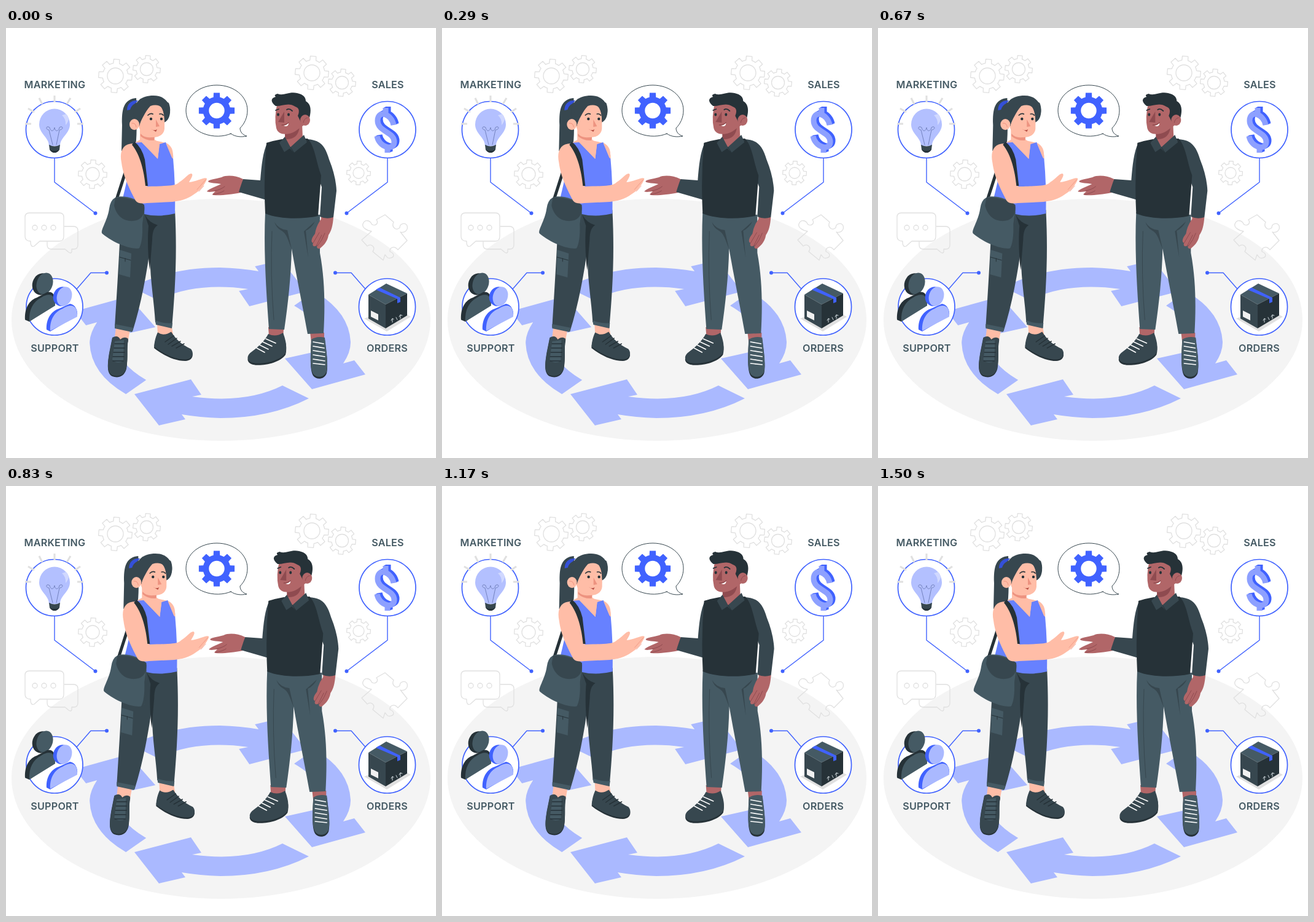
Write an HTML page that moves like this. It is 700 by 700 pixels and loops after 1.54 s.

```html
<!DOCTYPE html>
<html lang="en">
<head>
<meta charset="utf-8">
<style>
html, body { margin: 0; height: 100%; overflow: hidden; background: #fff; }
svg { display: block; width: 100vw; height: 100vh; fill: none; stroke-linecap: round; stroke-linejoin: round; }
text { font: 600 16.2px Inter, Roboto, sans-serif; letter-spacing: .2px; fill: #455a64; text-anchor: middle; }
.blue { fill: #4062ff; } .light { fill: #aab9ff; } .shirt { fill: #6781ff; }
.black { fill: #263238; } .dark { fill: #37474f; } .slate { fill: #455a64; }
.skin { fill: #ffbda7; } .blush { fill: #ed9380; } .brown { fill: #b16668; } .umber { fill: #8f4b50; }
.white { fill: #fff; } .grey { stroke: #e0e0e0; stroke-width: 1.3; }
.line { stroke: #4062ff; stroke-width: 1.4; }
.ink { stroke: #263238; stroke-width: 1; }
.lace { stroke: #fff; stroke-width: 1.6; } .cord { stroke: #263238; stroke-width: 1.5; }
</style>
</head>
<body>
<svg viewBox="0 0 700 700">
  <ellipse cx="350" cy="475" rx="341" ry="197" fill="#f4f4f4"/>
  <g class="light">
    <g id="arrows">
      <path d="M469 452Q517 480 517 513Q517 520 512 525L454 538 498 588 585 564 567 541 549 546Q561 528 561 512Q559 462 502 429Z"/>
      <path d="M209 596L301 572 318 597 303 600Q390 612 450 582L493 603Q430 635 349 635Q315 634 286 629L292 637 249 647Z"/>
    </g>
    <use href="#arrows" transform="rotate(180 348.600 512.500)"/>
  </g>

  <g id="gears" class="grey"></g>
  <g class="grey">
    <path d="M38 301H87Q94 301 94 308V339Q94 347 87 347H55L46 355Q40 358 40 347Q31 347 31 339V308Q31 301 38 301Z"/>
    <path d="M95 323H110Q117 323 117 330V353Q117 360 110 360H107V364Q106 368 102 365L96 360H74Q67 360 67 353V348"/>
    <circle cx="47" cy="325" r="4"/><circle cx="62" cy="325" r="4"/><circle cx="77" cy="325" r="4"/>
    <path d="M617 304L631 316C627 324 635 331 641 325C641 318 650 316 653 322C655 330 648 334 642 332L653 346 638 361C632 354 624 357 625 364C633 367 632 373 627 374C620 377 619 370 617 369L614 378 597 364C602 357 595 350 588 355L579 345 595 331C588 330 579 325 581 319C584 311 593 313 595 319C600 324 608 318 603 312Z"/>
  </g>

  <path d="M366 172C354 177 338 178 322 172C304 165 293 151 293 134C293 111 315 93 343 93C371 93 393 111 393 134C393 146 388 156 381 163C381 169 385 174 392 176C382 178 373 177 366 172Z" class="white" stroke="#37474f"/>

  <g class="line">
    <path d="M79 212V251L145.500 301.500M621 212V251L554.500 301.500M115 425L138 398.500H164M586 426L562 398.500H536"/>
    <g class="white" stroke-width="1.700">
      <circle cx="78.500" cy="165.500" r="46"/><circle cx="621" cy="165.500" r="46"/>
      <circle cx="79" cy="454" r="46"/><circle cx="620.500" cy="454" r="46"/>
    </g>
  </g>
  <g class="blue">
    <circle cx="145.500" cy="301.500" r="3"/><circle cx="554.500" cy="301.500" r="3"/>
    <circle cx="164" cy="398.500" r="3"/><circle cx="536" cy="398.500" r="3"/>
  </g>
  <text x="79.500" y="98">MARKETING</text><text x="621.500" y="98">SALES</text>
  <text x="79.500" y="527">SUPPORT</text><text x="620.500" y="527">ORDERS</text>

  <!-- bulb -->
  <path d="M79 110V121M54 114L59 124M105 114L99 124M36 131L46 137M121 131L112 137M31 156H41M116 156H126" stroke="#e0e0e0" stroke-width="3" stroke-linecap="butt"/>
  <path d="M70 192C70 178 54 172 54 157A25 25.500 0 0 1 104 157C104 172 88 178 88 192Z" fill="#b3c0ff"/>
  <path d="M91 142Q98 148 97 158Q106 148 98 140Z" fill="#d0d8ff"/>
  <path d="M76 190L70 166C63 165 66 158 71 162C73 170 78 168 79 162C80 170 86 168 87 162C92 158 95 165 87 166L82 190" stroke="#6371ad" stroke-width=".8"/>
  <path d="M70 190Q79 195 88 190L87 198Q79 208 71 198Z" class="dark"/>
  <path d="M71 198Q79 202 87 198Q84 203 79 203Q74 203 71 198Z" class="black"/>

  <!-- dollar -->
  <g stroke-linecap="butt">
    <g stroke="#4062ff" stroke-width="9">
      <path id="dollar" d="M635 156C632 138 609 130 609 149C609 167 637 167 636 184C635 199 611 192 608 174M622 128V142M625 190V201"/>
      <use href="#dollar" x="-2" y="1"/>
    </g>
    <use href="#dollar" x="-4" y="2" stroke="#8da0ff" stroke-width="9"/>
  </g>

  <!-- support people -->
  <ellipse cx="58" cy="417" rx="15" ry="18" transform="rotate(18 58 417)" class="black"/>
  <ellipse cx="63" cy="416" rx="13" ry="18" transform="rotate(18 63 416)" class="slate"/>
  <path d="M31 475C30 454 39 443 50 439L67 430C77 428 81 436 80 448L38 478Z" class="black"/>
  <path d="M38 478C37 458 44 446 57 439C71 430 81 434 80 452Z" class="slate"/>
  <ellipse cx="91" cy="437" rx="14" ry="16" transform="rotate(18 91 437)" class="blue"/>
  <ellipse cx="95" cy="437" rx="12" ry="16" transform="rotate(18 95 437)" class="light"/>
  <path d="M66 491C65 473 74 461 86 457L104 449C113 450 117 460 116 468L72 494Z" class="blue"/>
  <path d="M72 493C71 475 79 462 92 457C107 447 117 452 116 470Z" class="light"/>

  <!-- parcel -->
  <path d="M583 473L620 494 659 470 630 455Z" fill="#e0e0e0"/>
  <path d="M590 434L619 416 653 432 618 450Z" class="slate"/>
  <path d="M590 434L618 450V489L590 473Z" class="dark"/>
  <path d="M618 450L653 432V468L618 489Z" class="black"/>
  <path d="M602 426L608 422.500 642 439V446L637 448V441Z" class="blue"/>
  <path d="M594 460L606 466V476L594 470Z" fill="#f0f0f0"/>
  <path d="M629 473V479M627 476L629 473 631 474M635 471L637 475M642 467V473M640 470L642 467 645 468" stroke="#cfd8dc"/>

  <g id="people">
    <!-- woman -->
    <path d="M212 114C192 116 188 131 189 158L188 200H210C214 175 212 155 213 130Z" class="dark"/>
    <path d="M208 192L181 276" stroke="#263238" stroke-width="5"/>
    <path d="M179 487L202 491 199 507Q186 513 177 504ZM246 482L270 487 272 499Q259 506 247 499Z" class="skin"/>
    <g class="black">
      <path id="frontShoe" d="M173 506Q182 501 186 509Q193 503 199 508C196 522 199 537 196 555C192 569 181 570 173 567C164 562 165 550 168 531Z"/>
      <path id="sideShoe" d="M247 498Q257 505 269 497C278 512 290 520 301 525C307 532 303 542 292 542C274 542 255 532 241 521C242 511 244 504 247 498Z"/>
    </g>
    <g class="dark"><use href="#frontShoe" y="-2"/><use href="#sideShoe" y="-2.500"/></g>
    <path d="M177 510L192 508 191 542Q181 548 173 540Z" class="slate"/>
    <path d="M177 514H193M176 521H193M175 528H193M174 535H192M174 542H191" class="cord"/>
    <path d="M259 511L273 501M264 515L278 505M270 518L284 510M277 521L290 514" class="cord"/>
    <path d="M185 350C183 390 180 440 177 487L206 494C220 450 229 400 236 349C231 392 241 440 243 479L270 488C275 430 279 370 275 296L215 298Z" class="dark"/>
    <path d="M226 304Q233 317 247 321Q238 326 238 345L234 394C230 360 231 334 232 322Z" class="black"/>
    <path d="M177 482L207 488 205 495 177 489ZM243 476Q258 482 271 480L270 489 244 483Z" class="slate"/>
    <path d="M185 361L204 367 202 406 184 401Z" class="slate"/>
    <path d="M185 373L203 378M194 375V380" class="ink"/>
    <path d="M218 164L218 182 207 188 222 214 248 219 270 212C274 204 271 191 260 187L242 183 241 170Z" class="skin"/>
    <path d="M207 187L221 186 247 213 250 189 260 186 272 212Q276 255 275 302Q248 309 220 302L190 277Q196 253 200 233Z" class="shirt"/>
    <path d="M221 186L247 213 250 188 240 180Z" class="skin"/>
    <path d="M272 213Q274 200 260 187L270 211Z" class="skin"/>
    <path d="M178 276C191 271 214 278 225 288C226 315 224 340 222 356C216 364 181 355 157 335C152 331 165 315 168 294Q170 280 178 276Z" class="slate"/>
    <path d="M178 276Q202 274 225 288C227 300 222 310 213 313C198 317 181 311 176 289Z" class="dark"/>
    <path d="M222 319L225 298V338Q224 361 216 360Q223 349 222 319Z" class="dark"/>
    <path d="M209 188C191 187 184 200 188 219C191 243 202 264 211 281Q215 287 229 285L271 283C290 281 299 276 310 268C318 263 327 249 327 245C323 242 311 250 298 251C300 247 306 239 302 237C297 236 291 246 282 251C276 257 268 257 230 258C226 240 221 223 217 204Q215 193 209 188Z" class="skin"/>
    <path d="M311 263L325 247M314 266L322 257" stroke="#ed9380" stroke-width=".8"/>
    <path d="M209 185Q221 194 226 214L231 257H227C225 235 219 207 205 190Z" class="black"/>
    <path d="M219 172Q227 181 242 177L241 183Q228 184 219 176Z" class="blush"/>
    <path d="M209 150C204 122 218 110 240 110C260 110 268 124 267 138C266 147 262 153 256 154L220 159Z" class="dark"/>
    <path d="M235 127Q247 123 254 130C259 139 258 153 258 164C257 175 246 180 234 177C225 175 218 169 216 160C221 149 226 137 235 127Z" class="skin"/>
    <path d="M239 120C226 123 222 143 217 160L210 145Q214 126 239 120Z" class="dark"/>
    <path d="M243 122C253 124 258 136 258 152C268 144 269 132 265 122L250 114Z" class="dark"/>
    <ellipse cx="209" cy="157" rx="8" ry="9" class="skin"/>
    <path d="M205 155Q211 154 212 161" stroke="#ed9380"/>
    <path d="M197 134C197 123 204 117 215 118L210 123Q204 126 202 133Z" fill="#3450d8"/>
    <path d="M244 149L250 160 244 161Z" class="blush"/>
    <path d="M236 164Q240 168 246 165L244 169Z" fill="#b85045"/>
    <circle cx="236" cy="148" r="2.200" class="black"/><circle cx="253" cy="148" r="2.200" class="black"/>
    <path d="M231 142Q235 138 239 140M250 140Q254 139 256 142" stroke="#263238" stroke-width="1.700"/>

    <!-- man -->
    <path d="M427 487L452 490 451 504Q438 510 428 501ZM495 495L518 496 518 512H497Z" class="brown"/>
    <g class="black">
      <path id="turnedShoe" d="M427 501Q439 507 451 499C455 510 458 521 455 532C445 546 416 551 402 548C391 545 391 536 400 530C412 521 421 512 427 501Z"/>
      <path id="facingShoe" d="M497 510Q507 504 519 507C521 526 525 547 522 562C518 573 505 573 500 566C494 557 496 529 497 510Z"/>
    </g>
    <use href="#turnedShoe" y="-3" class="dark"/><use href="#facingShoe" y="-3" class="slate"/>
    <path d="M423 506L439 513M418 511L433 518M413 516L427 523M408 521L421 528" class="lace"/>
    <path d="M500 511L517 514M500 518L518 521M500 525L519 528M500 532L519 535M500 539L519 542M500 546L519 548" class="lace"/>
    <path d="M422 300C419 365 424 433 428 490L453 491C459 450 464 405 465 359C472 400 484 458 491 498L517 497C519 460 520 414 511 366V304Z" class="slate"/>
    <path d="M437 316Q444 328 458 329L465 360C459 345 457 334 447 329Q440 325 437 316ZM503 315Q497 326 488 330L492 374 485 331Z" class="dark"/>
    <path d="M433 331Q430 400 436 475" stroke="#37474f"/>
    <path d="M386 246C374 240 359 239 351 243C340 246 329 247 329 250C331 253 343 252 350 254C342 258 330 262 327 266C330 268 336 266 341 266C337 269 334 272 338 272C350 273 366 271 382 268Z" class="brown"/>
    <path d="M340 265Q350 263 356 258M338 271Q349 269 355 265" stroke="#8f4b50"/>
    <path d="M426 186C418 201 416 224 414 248L386 246Q382 257 379 267L424 280Z" class="dark"/>
    <path d="M513 306L533 308C532 321 530 330 525 337C523 350 515 355 511 359C506 360 505 356 507 353C501 358 498 354 500 350C495 348 498 341 503 335Q505 322 513 311Z" class="brown"/>
    <path d="M514 337L505 355M510 333L500 350M519 334Q515 345 507 355" stroke="#8f4b50"/>
    <path d="M490 181C510 182 519 190 526 214Q537 241 538 265L533 308Q522 312 511 307L514 259 499 219Z" class="dark"/>
    <path d="M424 187Q437 183 449 181L491 180C503 192 505 219 513 240L508 306C480 312 443 311 422 302Q419 245 424 187Z" class="black"/>
    <path d="M455 165L453 187 464 196 483 178 482 155Z" class="brown"/>
    <path d="M454 172Q468 174 478 160Q476 182 455 181Z" class="umber"/>
    <path d="M454 177L463 194 485 174 490 186 469 203 462 196 453 202 445 187Z" class="dark"/>
    <path d="M463 194L469 203" class="ink"/>
    <path d="M442 121Q436 146 440 163C443 175 459 175 471 168L485 158 488 128 465 117Z" class="brown"/>
    <path d="M439 127C430 120 431 114 439 112Q435 109 442 107C452 111 460 103 474 106C484 108 488 113 488 119C497 124 497 135 494 146L480 153 475 143Q480 131 471 128C460 120 448 128 439 127Z" class="black"/>
    <ellipse cx="487" cy="150" rx="8" ry="9" class="brown"/>
    <path d="M484 154Q485 147 491 146" stroke="#8f4b50"/>
    <path d="M453 136L443 153 453 154Z" class="umber"/>
    <path d="M452 159Q457 158 460 155Q460 160 455 160Z" class="white"/>
    <path d="M449 158Q456 158 460 154" stroke="#713338" stroke-width=".8"/>
    <ellipse cx="443" cy="141" rx="2" ry="2.400" class="black"/><ellipse cx="460" cy="141" rx="2" ry="2.400" class="black"/>
    <path d="M439 134L444 132M457 133Q461 130 466 135" stroke="#263238" stroke-width="1.800"/>
  </g>
</svg>
<script>
const gears = document.getElementById('gears');
const people = document.getElementById('people');

function ring(x, y, r) {
  return `M${x + r} ${y}A${r} ${r} 0 1 0 ${x - r} ${y}A${r} ${r} 0 1 0 ${x + r} ${y}Z`;
}

function gear(x, y, radius, hole, turn = 0, attrs = '') {
  const points = [];
  for (let tooth = 0; tooth < 8; tooth++) {
    for (const [angle, size] of [[-.24, .76], [-.17, 1], [.17, 1], [.24, .76], [.39, .76]]) {
      const a = tooth * Math.PI / 4 + angle + turn;
      points.push(`${(x + radius * size * Math.cos(a)).toFixed(1)} ${(y + radius * size * Math.sin(a)).toFixed(1)}`);
    }
  }
  return `<path d="M${points.join('L')}Z${ring(x, y, hole)}" fill-rule="evenodd" ${attrs}/>`;
}

gears.innerHTML = gear(178, 78, 27.5, 13, .08) + gear(229, 67, 22.5, 10.5, .1) +
  gear(141, 238, 23.5, 11, .05) + gear(498, 73, 27.5, 13, .08) +
  gear(547, 89, 22.5, 10.5, .1) + gear(574, 236, 19.5, 9, .05);
people.insertAdjacentHTML('beforebegin', gear(343, 134.5, 29.5, 12.7, 0, 'class="blue"'));

// Shake: horizontal offsets reached at the given milliseconds.
const times = [0, 140, 280, 440, 610, 760, 910, 1050, 1190, 1350, 1500];
const offsets = [0, -1.4, 2.8, -5.6, 5.6, -5.6, 5.6, -5.6, 2.8, -1.4, 0];
const LOOP = 1540, STEPS = 37;

// CSS "ease", cubic-bezier(.25, .1, .25, 1)
function ease(x) {
  let low = 0, high = 1, s;
  for (let i = 0; i < 20; i++) {
    s = (low + high) / 2;
    if (.75 * s * (1 - s) + s ** 3 < x) low = s; else high = s;
  }
  return .3 * s * (1 - s) ** 2 + 3 * s * s * (1 - s) + s ** 3;
}

function shake(ms) {
  const next = times.findIndex(t => t > ms);
  if (next < 0) return 0;
  const start = times[next - 1], from = offsets[next - 1];
  return from + (offsets[next] - from) * ease((ms - start) / (times[next] - start));
}

function draw(now) {
  const step = Math.floor((now % LOOP) / LOOP * STEPS + .1);
  people.setAttribute('transform', `translate(${shake(step * 1000 / 24).toFixed(2)} 0)`);
  requestAnimationFrame(draw);
}
draw(performance.now());
</script>
</body>
</html>
```
